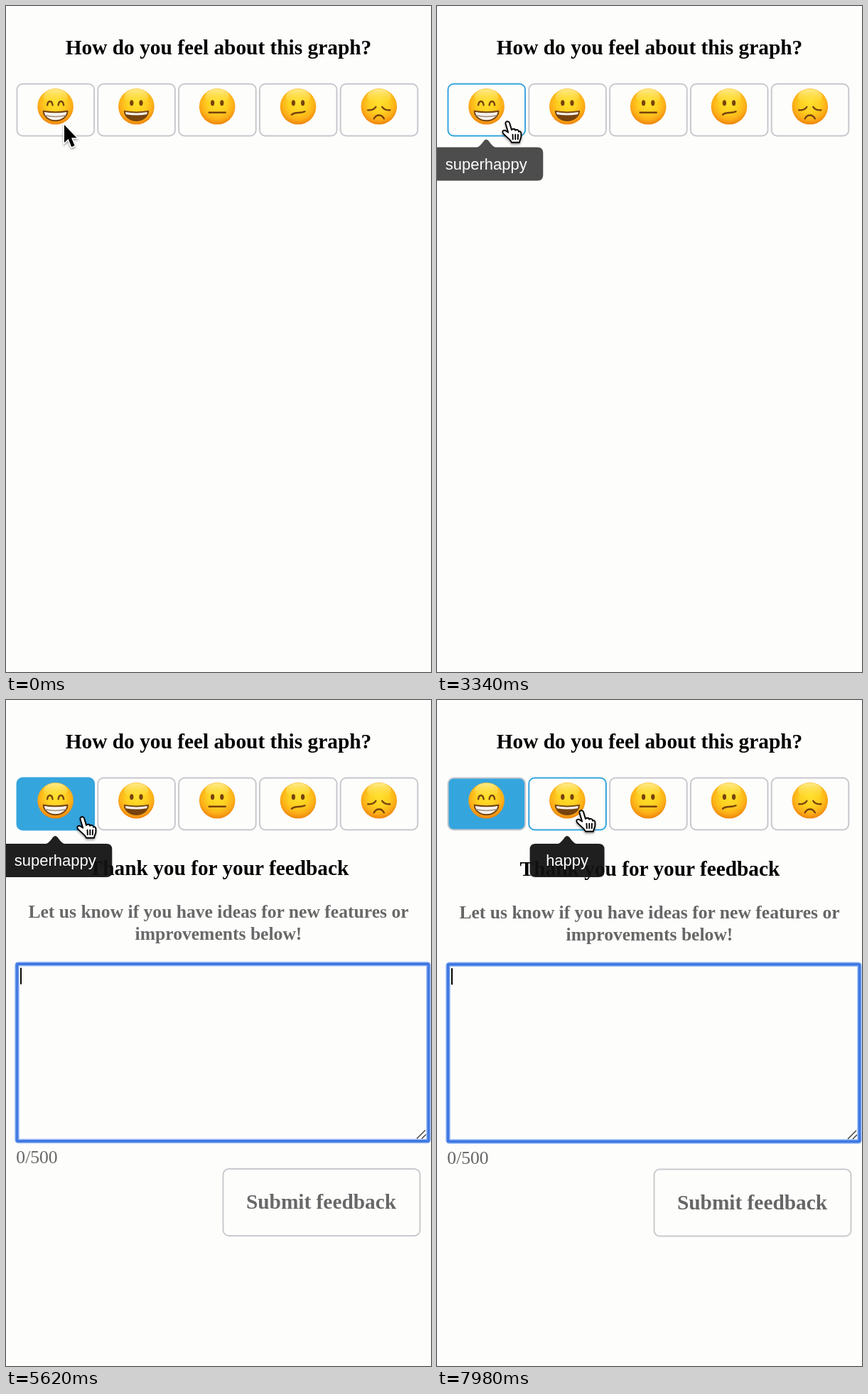
These frames come from a looping animation (598 by 936 pixels, 8000 ms). An HTML page:

```html
<!DOCTYPE html>
<html lang="en">
<head>
<meta charset="utf-8">
<title>Feedback form</title>
<style>
  html, body { margin: 0; width: 100%; height: 100%; overflow: hidden; background: #fdfdfc; }
  svg { display: block; width: 598px; height: 936px; }
  text { text-anchor: middle; font-family: "Liberation Serif", Times, serif; }
  .head { font-size: 29.35px; font-weight: bold; }
  .note { font-size: 25.6px; font-weight: bold; fill: #666; }
  .tip text { font: 22px "Liberation Sans", Arial, sans-serif; fill: #fff; }
  .ink { fill: none; stroke: #76430f; stroke-width: 2.4; stroke-linecap: round; }
  .eye { fill: #76430f; }
</style>
</head>
<body>
<svg viewBox="0 0 598 936">
  <defs>
    <radialGradient id="skin" cx=".5" cy=".4" r=".62">
      <stop offset="0" stop-color="#ffe02c"/>
      <stop offset=".45" stop-color="#fecf20"/>
      <stop offset=".75" stop-color="#fcae18"/>
      <stop offset="1" stop-color="#ec7d0a"/>
    </radialGradient>
    <linearGradient id="gloss" x2="0" y2="1">
      <stop offset="0" stop-color="#fff3a0" stop-opacity=".85"/>
      <stop offset="1" stop-color="#ffe64a" stop-opacity="0"/>
    </linearGradient>
    <filter id="shadow" x="-50%" y="-50%" width="200%" height="200%">
      <feDropShadow dx="0" dy="2" stdDeviation="1.6" flood-opacity=".4"/>
    </filter>
  </defs>

  <text class="head" x="299" y="68">How do you feel about this graph?</text>
  <g id="buttons"></g>

  <g id="form">
    <text class="head" x="299.5" y="246.5">Thank you for your feedback</text>
    <text class="note" x="299" y="307">Let us know if you have ideas for new features or</text>
    <text class="note" x="299" y="338">improvements below!</text>
    <g fill="none">
      <rect x="15.5" y="371.5" width="579" height="249" rx="2" stroke="#b3cdf9" stroke-width="7"/>
      <rect x="15.5" y="371.5" width="579" height="249" rx="1" stroke="#3f78e2" stroke-width="4"/>
    </g>
    <path d="M578 617L590 605M585 617L591 611" stroke="#444" stroke-width="1.5"/>
    <rect id="caret" x="20" y="377" width="2" height="23"/>
    <text x="43.5" y="652" font-size="25.6" fill="#666">0/500</text>
    <rect x="305.5" y="659.5" width="277" height="94" rx="8" fill="none" stroke="#cacace" stroke-width="2"/>
    <text class="head" x="443.5" y="716" fill="#666">Submit feedback</text>
  </g>

  <g id="tips"></g>

  <g id="cursor" filter="url(#shadow)">
    <path id="arrow" d="M0 0V25L5.6 19.8L10.2 31L14.6 29.2L10 18.3H17.5Z" stroke="#fff" stroke-width="2.6" paint-order="stroke"/>
    <g id="hand" transform="translate(0 -.8)" stroke="#000" stroke-width="1.9" stroke-linejoin="round" stroke-linecap="round">
      <path fill="#fff" d="M-1.5 3C-2 -.5 3 -1 4 2L7 12C8 10 12 10 12 12.5C14 11 17 12 17 14.5C19 13 20.4 15 20.4 17V21C20.4 24 18.5 25 18 29.5H7C6 26 0 22 -4.5 17.5C-7.5 13.5 -4 11 0 14L2.2 15.5Z"/>
      <path fill="none" d="M8.5 18.5L8.8 25M12.3 18.5V25M16 18.5L15.8 25"/>
    </g>
  </g>
</svg>
<script>
const LOOP = 8000, PITCH = 113.8;
const BLUE = [53, 165, 222], GRAY = [200, 200, 206];
const $ = id => document.getElementById(id);

// Facial features, relative to the centre of each face
const openEyes = '<ellipse class="eye" cx="-6.6" cy="-5" rx="2.6" ry="4"/><ellipse class="eye" cx="6.6" cy="-5" rx="2.6" ry="4"/>';
const bowl = 'M-17 6.5Q0 9.5 17 6.5C16.5 14.5 9 20 0 20S-16.5 14.5 -17 6.5Z';
const features = [
  `<path class="ink" d="M-11.5 -2C-10.5 -9 -5 -9 -4 -2M4 -2C5 -9 10.5 -9 11.5 -2"/>
   <path d="${bowl}" fill="#f6f3ee" stroke="#76430f" stroke-width="2" stroke-linejoin="round"/>
   <path d="M-15 12.5Q0 16 15 12.5" fill="none" stroke="#a08b78" stroke-width="1.5"/>`,
  `${openEyes}<path class="eye" d="${bowl}" stroke="#76430f" stroke-width="1.4" stroke-linejoin="round"/>
   <path d="M-15.5 7.8Q0 10.6 15.5 7.8L14.6 11Q0 13.4 -14.6 11Z" fill="#f6f3ee"/>`,
  `${openEyes}<path class="ink" d="M-11.5 8.5H11.5"/>`,
  `${openEyes}<path class="ink" d="M-9 11.5C-4 6.5 3 10.5 9.5 7"/>`,
  `<path class="ink" d="M-15.5 5C-10 5.5 -6.5 3.5 -4.5 .5M15.5 5C10 5.5 6.5 3.5 4.5 .5M-7 17C-4 10.5 4 10.5 7 17"/>`
];
$('buttons').innerHTML = features.map((face, i) => `
  <rect x="${15.5 + i * PITCH}" y="109.5" width="108.6" height="73" rx="8" stroke-width="2"/>
  <g transform="translate(${69.6 + i * PITCH} 141.3)">
    <circle r="25.3" fill="url(#skin)"/><ellipse cy="-14" rx="17" ry="10.5" fill="url(#gloss)"/>${face}
  </g>`).join('');
const boxes = [...$('buttons').querySelectorAll('rect')];

const tipShape = half => `M${8 - half} 202H-13C-7 201 -4 191 0 191S7 201 13 202H${half - 8}q8 0 8 8V241q0 8 -8 8H${8 - half}q-8 0 -8 -8V210q0 -8 8 -8Z`;
$('tips').innerHTML = [['superhappy', 80], ['happy', 52.5]].map(([label, half]) =>
  `<g class="tip"><path d="${tipShape(half)}" fill="#111" fill-opacity=".94"/><text y="233">${label}</text></g>`).join('');
const tips = [...$('tips').children];

// Pointer path: time, x, y
const path = [[20, 82, 167], [820, 84, 159], [2400, 84, 159], [2500, 86, 158], [2560, 86, 158],
  [3240, 98, 163], [5040, 98, 163], [5620, 106, 165], [5820, 107, 165], [5960, 160, 106],
  [6120, 200, 152], [6300, 201, 155], [6600, 202, 156]];

const clamp = v => Math.min(1, Math.max(0, v));
const ramp = (t, from, to) => {
  const u = clamp((t - from) / (to - from));
  return u * u * (3 - 2 * u);
};
const mix = (a, b, u) => a + (b - a) * u;
const tint = u => `rgb(${GRAY.map((c, i) => Math.round(mix(c, BLUE[i], u)))})`;

// CSS "ease": cubic-bezier(.25, .1, .25, 1), solved by bisection
function ease(x) {
  const bezier = (a, b, s) => 3 * a * s * (1 - s) ** 2 + 3 * b * s * s * (1 - s) + s ** 3;
  let lo = 0, hi = 1;
  for (let i = 0; i < 20; i++) {
    const mid = (lo + hi) / 2;
    if (bezier(.25, .25, mid) < x) lo = mid; else hi = mid;
  }
  return bezier(.1, 1, lo);
}

function pointer(t) {
  const i = path.findIndex(p => p[0] > t);
  if (i === 0) return path[0].slice(1);
  if (i < 0) return path[path.length - 1].slice(1);
  const [a, b] = [path[i - 1], path[i]], u = ramp(t, a[0], b[0]);
  return [mix(a[1], b[1], u), mix(a[2], b[2], u)];
}

function placeTip(i, opacity, lift) {
  tips[i].setAttribute('transform', `translate(${69.3 + i * PITCH} ${-16 * lift})`);
  tips[i].setAttribute('opacity', opacity);
}

function draw(t) {
  const hover = [ramp(t, 2470, 2610) - ramp(t, 5900, 6060), ramp(t, 6020, 6180), 0, 0, 0];
  const chosen = t < 5020 ? 0 : mix(.84, 1, ramp(t, 5020, 5300));
  boxes.forEach((box, i) => {
    box.setAttribute('stroke', tint(hover[i]));
    box.setAttribute('fill', `rgba(${BLUE},${i ? 0 : chosen})`);
  });

  const shown = t < 5020 ? 0 : ease(clamp((t - 4860) / 920));
  $('form').setAttribute('opacity', shown);
  $('form').setAttribute('transform', `translate(0 ${-29 * (1 - shown)})`);
  $('caret').setAttribute('opacity', Math.floor((t - 5020) / 1000) % 2 ? 0 : 1);

  const tipIn = ramp(t, 3060, 3460);
  placeTip(0, tipIn * (1 - ramp(t, 6310, 6690)), 1 - tipIn + ramp(t, 6240, 6600));
  const nextIn = ramp(t, 6260, 6650);
  placeTip(1, nextIn, 1 - nextIn);

  $('cursor').setAttribute('transform', `translate(${pointer(t)})`);
  $('arrow').setAttribute('visibility', t < 2500 ? 'visible' : 'hidden');
  $('hand').setAttribute('visibility', t < 2500 ? 'hidden' : 'visible');
}

const start = performance.now();
function tick() {
  draw((performance.now() - start) % LOOP);
  requestAnimationFrame(tick);
}
tick();
</script>
</body>
</html>
```
